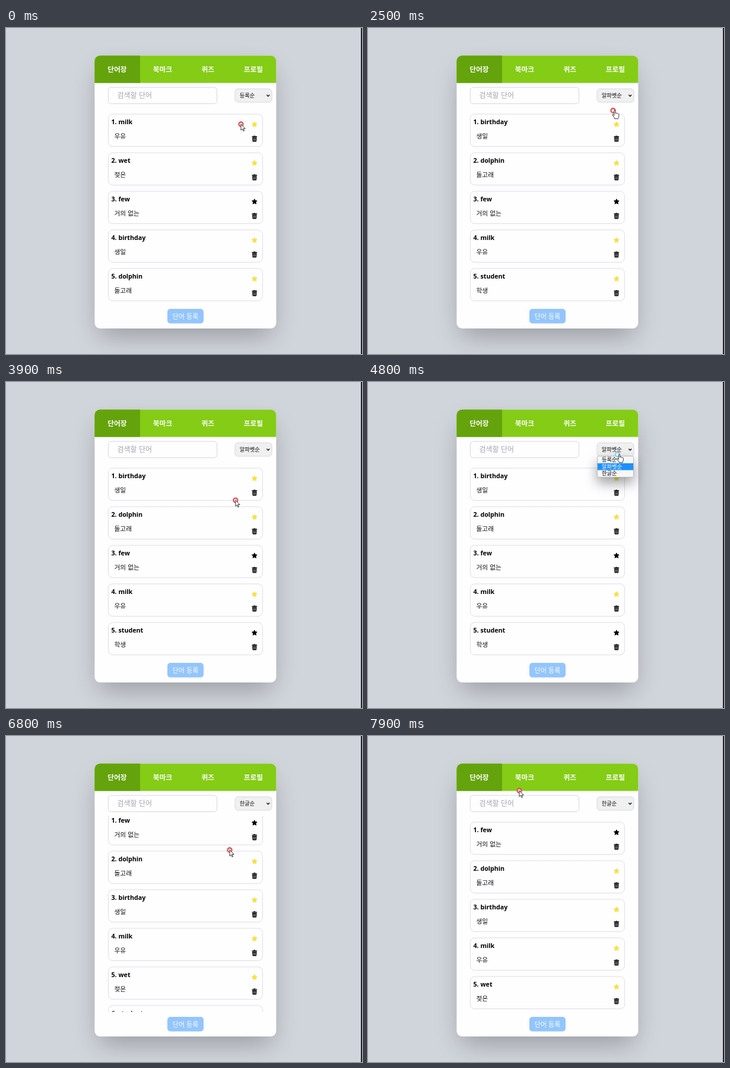
An HTML page that plays this animation: 600x549 px, repeating every 8000 ms.

```html
<!DOCTYPE html>
<html lang="ko">
<head>
<meta charset="utf-8">
<title>단어장</title>
<style>
  html, body { margin: 0; width: 100%; height: 100%; overflow: hidden; background: #d0d4db; }
  svg { display: block; position: absolute; left: 0; top: 0; }
  .shadow { position: absolute; left: 150px; top: 47px; width: 305px; height: 458px; border-radius: 9px;
    box-shadow: 0 20px 44px -8px rgba(0, 0, 0, .28); }
  text { font-family: "Noto Sans CJK KR", "Noto Sans CJK", "Noto Sans", sans-serif; font-size: 10.7px; fill: #111; }
  .tab { font-size: 11.7px; font-weight: 700; fill: #fff; text-anchor: middle; }
  .hint { font-size: 12px; fill: #a3a7af; }
  .word { font-family: "Open Sans", "Noto Sans", sans-serif; font-size: 10.7px; font-weight: 700; fill: #000; }
  .small { font-size: 9.3px; }
  .button { font-size: 11px; fill: #fff; text-anchor: middle; }
  .menu { filter: drop-shadow(0 10px 10px rgba(0, 0, 0, .36)); }
</style>
</head>
<body>
<div class="shadow"></div>
<svg width="600" height="549" viewBox="0 0 600 549">
  <defs>
    <clipPath id="panel"><rect x="149.4" y="46.5" width="306" height="459.4" rx="9"/></clipPath>
    <clipPath id="view"><rect x="160" y="134.5" width="290" height="330"/></clipPath>
    <path id="star" d="M0-4.3 1.3-1.5 4.3-1.1 2.1 1 2.7 4.1 0 2.6-2.7 4.1-2.1 1-4.3-1.1-1.3-1.5Z"
      stroke-width="1" stroke-linejoin="round"/>
    <g id="trash">
      <path d="M-4.3-4.3H-1.8L-1.3-5.1H1.3L1.8-4.3H4.3V-2.9H-4.3Z"/>
      <path d="M-3.7-2.4H3.7L3.3 4.2Q3.2 5 2.4 5H-2.4Q-3.2 5-3.3 4.2Z"/>
      <path d="M-1.7-1V3.6M0-1V3.6M1.7-1V3.6" stroke="#fff" stroke-width=".6"/>
    </g>
  </defs>

  <g clip-path="url(#panel)">
    <rect x="149" y="46" width="307" height="460" fill="#fefdff"/>
    <rect x="149" y="46" width="307" height="46.5" fill="#84cc16"/>
    <rect x="149" y="46" width="77" height="46.5" fill="#65a30d"/>
  </g>
  <g id="tabs"></g>

  <rect x="172.4" y="100" width="183.2" height="27.5" rx="5" fill="#fefdff" stroke="#d6d9df"/>
  <text class="hint" x="187.5" y="118.3">검색할 단어</text>

  <rect x="386" y="102.5" width="62" height="22.5" rx="5" fill="#f0f0f1" stroke="#d6d9df"/>
  <text id="choice" class="small" x="393.7" y="117.2"></text>
  <path d="M439.4 112.4 441.8 114.9 444.2 112.4" fill="none" stroke="#111" stroke-width="1.4"/>

  <g clip-path="url(#view)"><g id="list"></g></g>

  <rect x="272" y="473" width="61" height="24.5" rx="5" fill="#93c5fd"/>
  <text class="button" x="302.5" y="489.5">단어 등록</text>

  <g id="menu" class="menu">
    <rect x="386.5" y="124.8" width="61" height="35.5" rx="2" fill="#f7f7f8" stroke="#a9abb0" stroke-width=".8"/>
    <rect id="hover" x="387" width="60" height="11.6" fill="#1e90ff"/>
    <g id="options"></g>
  </g>

  <circle id="ring" r="3.6" stroke-width="2.1"/>
  <g id="pointer" fill="#fff" stroke="#222" stroke-width=".9" stroke-linejoin="round">
    <path id="arrow" d="M0 0V10.2L2.4 8 4 11.7 5.6 11 4 7.4H7.2Z"/>
    <path id="hand" d="M-1.1 1Q-1-.6 0-.6T1.1 1V4.7L1.4 4Q2.7 3.5 3.1 4.8 4.5 4.1 5 5.4 6.6 4.9 6.8 6.6V9.8Q6.5 11.5 5.6 12.4V13.8H-.4V12.6L-3.8 7.9Q-4.2 6.5-2.8 6.6L-1.1 8.2Z"/>
  </g>
  <rect x="598.3" width="1.7" height="549" fill="#08080a"/>
</svg>
<script>
const $ = id => document.getElementById(id);
const LOOP = 8000, STEP = 100;
const LIST_TOP = 145, ROW = 65, MAX_SCROLL = 69.6;
const MENU_TOP = 125.2, OPTION = 11.6;

const meaning = { milk: '우유', wet: '젖은', few: '거의 없는', birthday: '생일', dolphin: '돌고래', student: '학생' };
const words = Object.keys(meaning);
const sorts = [
  { label: '등록순', words },
  { label: '알파벳순', words: [...words].sort() },
  { label: '한글순', words: [...words].sort((a, b) => meaning[a] < meaning[b] ? -1 : 1) }
];

// Each visit to the menu picks the next sort order.
const visits = [
  { open: 600, close: 1600, sorted: 1700 },
  { open: 4300, close: 5600, sorted: 6000 }
];

const home = { x: 396, y: 162 };
const moves = [
  { from: 0, to: 400, x: 416, y: 114 },
  { from: 900, to: 1300, x: 416, y: 139 },
  { from: 2500, to: 2800, x: 367, y: 241 },
  { from: 3700, to: 4200, x: 423.5, y: 122 },
  { from: 4900, to: 5300, x: 418, y: 152 },
  { from: 6000, to: 6500, x: 377, y: 192 },
  { from: 7500, to: 7900, x: 255, y: 92 }
];

const between = (t, a, b) => t >= a && t < b;
function ramp(t, from, to) {
  const p = Math.min(1, Math.max(0, (t - from) / (to - from)));
  return p * p * (3 - 2 * p);
}
const downAndUp = (t, down, up) => ramp(t, down, down + 400) - ramp(t, up, up + 400);
const scrollAt = t => MAX_SCROLL * (downAndUp(t, 2900, 3500) + downAndUp(t, 6675, 7300));
const countPast = (t, key) => visits.filter(v => t >= v[key]).length;

const pointerAt = t => moves.reduce((at, m) => {
  const p = ramp(t, m.from, m.to);
  return { x: at.x + (m.x - at.x) * p, y: at.y + (m.y - at.y) * p };
}, home);

function card(word, i, marked) {
  const color = marked ? '#f6e13f' : '#000';
  return `<g transform="translate(0 ${LIST_TOP + i * ROW})">
    <rect x="172.4" width="260" height="54.5" rx="7.5" fill="#fefdff" stroke="#dddde5"/>
    <text class="word" x="177.5" y="17.4">${i + 1}. ${word}</text>
    <text x="182.5" y="40.8">${meaning[word]}</text>
    <use href="#star" x="418.8" y="17.2" fill="${color}" stroke="${color}"/>
    <use href="#trash" x="418.8" y="41.6"/></g>`;
}

$('tabs').innerHTML = ['단어장', '북마크', '퀴즈', '프로필']
  .map((name, i) => `<text class="tab" x="${187.3 + i * 76.5}" y="74.2">${name}</text>`).join('');
$('options').innerHTML = sorts
  .map((s, i) => `<text class="small" x="394" y="${134.2 + i * OPTION}">${s.label}</text>`).join('');

const show = (id, on) => $(id).style.display = on ? '' : 'none';

let shownList = '';
function draw(t) {
  const isMarked = w => w !== 'few' && (w !== 'student' || t < 2700);
  const list = sorts[countPast(t, 'sorted')].words.map((w, i) => card(w, i, isMarked(w))).join('');
  if (list !== shownList) $('list').innerHTML = shownList = list;
  $('list').setAttribute('transform', `translate(0 ${-scrollAt(t)})`);

  const choice = countPast(t, 'close');
  $('choice').textContent = sorts[choice].label;

  const { x, y } = pointerAt(t);
  const open = visits.some(v => between(t, v.open, v.close));
  const hover = y < MENU_TOP ? choice : Math.min(2, Math.floor((y - MENU_TOP) / OPTION));
  show('menu', open);
  $('hover').setAttribute('y', MENU_TOP + hover * OPTION);
  [...$('options').children].forEach((o, i) => o.style.fill = i === hover ? '#fff' : '#111');

  const hand = between(t, 2000, 2700) || between(t, 4300, 5000);
  $('pointer').setAttribute('transform', `translate(${x} ${y})`);
  show('arrow', !hand);
  show('hand', hand);
  show('ring', hand || !open);
  $('ring').setAttribute('cx', x - (hand ? 3 : 0));
  $('ring').setAttribute('cy', y);
  $('ring').style.stroke = open ? '#86cdf3' : '#e24a4a';
  $('ring').style.fill = open ? '#eef8fd' : '#f8e2e2';
}

const start = performance.now();
function tick() {
  const t = (performance.now() - start) % LOOP;
  draw(Math.floor(t / STEP) * STEP);
  requestAnimationFrame(tick);
}
tick();
</script>
</body>
</html>
```
